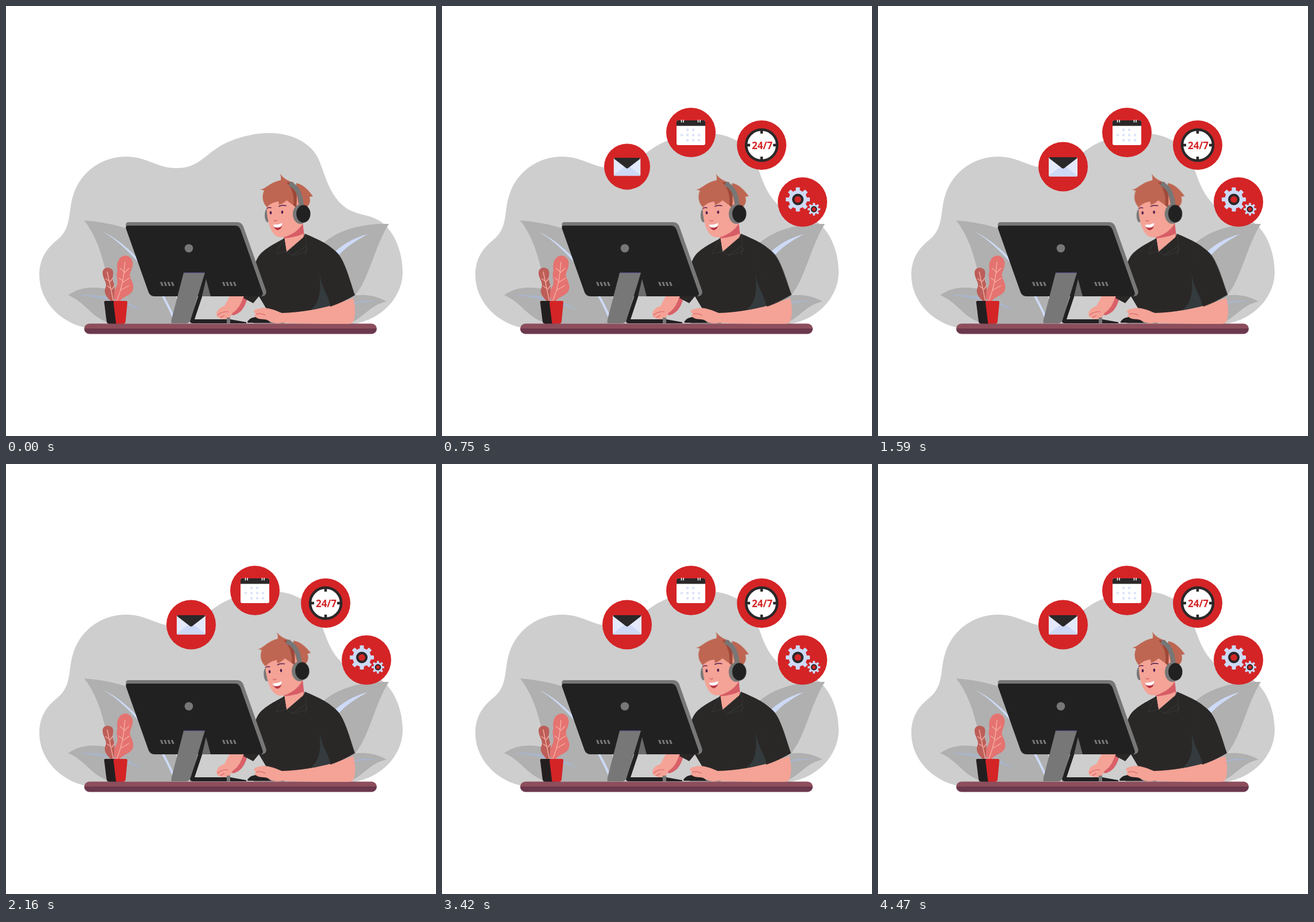
Recreate the animation shown at these times as an HTML page. Size 748x748 px, loop 4.5 s.

```html
<!DOCTYPE html>
<html lang="en">
<head>
<meta charset="utf-8">
<title>Support desk</title>
<style>
html, body { margin: 0; width: 100%; height: 100%; overflow: hidden; background: #fff; }
svg { display: block; width: 100vw; height: 100vh; }
.icon { transform-box: view-box; transform: scale(0); }
#head { transform-origin: 490px 395px; }
#sleeve { transform-origin: 565px 425px; }
text { font: 700 17px "Open Sans", sans-serif; }
</style>
</head>
<body>
<svg viewBox="0 0 748 748">
  <path fill="#cecece" d="M136 559C90 548 58 510 58 468C58 437 73 420 90 406C116 385 107 355 118 326C130 290 165 262 209 262C245 262 262 282 296 282C340 282 345 254 390 235C413 226 435 221 458 221C500 221 530 240 542 263C556 292 560 330 594 353C615 365 632 362 652 375C677 393 690 430 690 463C690 505 655 545 605 553L140 560Z"/>

  <g id="leaves">
    <g fill="#b0b0b0">
      <path d="M136 373C180 377 235 386 265 425C290 460 298 510 302 552H205C195 530 186 505 180 484C170 455 166 412 136 373Z"/>
      <path d="M108 503C135 484 170 488 200 500C225 511 245 535 255 552H185C150 546 139 515 108 503Z"/>
      <path d="M666 379C630 378 585 385 555 410C520 440 505 500 505 552C550 535 595 525 612 497C632 470 643 415 666 379Z"/>
      <path d="M662 514C640 502 620 500 590 506L560 552H598C625 540 632 521 662 514Z"/>
    </g>
    <path fill="#cddaf6" d="M169 393C218 416 266 474 298 552H293C268 485 217 421 169 393Z"/>
    <path fill="#a9b5cb" d="M124 503C160 500 205 508 236 529C200 516 165 506 124 503Z"/>
    <path fill="#cddaf6" d="M629 397C602 404 585 416 570 429L576 437C590 420 606 410 629 397Z"/>
    <path fill="#a9b5cb" d="M646 514C630 512 615 512 600 517V520C615 515 630 515 646 514Z"/>
  </g>

  <g id="plant">
    <path fill="#bd5e58" d="M183 514C175 507 169 498 173 490C177 482 168 474 168 464C168 456 176 453 183 457C190 462 184 470 186 478C190 487 189 500 188 514Z"/>
    <path fill="#e57370" d="M191 514C186 503 188 494 192 488C197 478 190 470 194 460C191 446 198 434 208 434C217 435 222 443 220 452C219 460 214 464 216 471C218 478 223 484 221 493C218 504 205 504 197 514Z"/>
    <g fill="none" stroke="#f5aea4" stroke-width="1.4">
      <path d="M176 462L187 514M180 479L173 474M181 480L186 473M183 492L176 487M184 493L189 486"/>
      <path d="M207 445C205 470 202 492 192 514M205 462L198 456M206 464L214 456M203 478L196 473M203 481L215 473M200 494L214 486"/>
    </g>
    <path fill="#231f20" d="M173 513H194V553H180Q176 553 175 549L171 517Q170 513 173 513Z"/>
    <path fill="#d42426" d="M188 513H208Q212 513 211 517L208 549Q207 553 203 553H194Q191 553 191 549L187 516Z"/>
  </g>

  <g id="desk">
    <clipPath id="top"><rect x="136" y="552.5" width="509" height="18" rx="9"/></clipPath>
    <g clip-path="url(#top)">
      <rect x="136" y="552" width="509" height="9" fill="#8d4e5d"/>
      <rect x="136" y="561" width="509" height="10" fill="#6b384d"/>
    </g>
  </g>

  <g id="leftArm">
    <path fill="#d96068" d="M403 504H421C417 520 412 533 396 538L385 535Z"/>
    <path fill="#f4a396" d="M390 503H414C409 517 405 527 394 534L389 543C381 546 372 545 367 540C364 532 370 525 380 522Z"/>
    <path fill="none" stroke="#d96068" stroke-width="1.2" d="M368 538C373 533 379 531 387 532M373 542L380 538"/>
  </g>

  <g id="body">
    <path fill="#d75c66" d="M483 400L516 375L519 402L487 428Z"/>
    <path fill="#f4a396" d="M484 404C493 403 505 402 517 396L518 403L488 430Z"/>
    <path fill="#2a2827" d="M484 404C473 411 449 421 439 436C430 450 425 480 413 508L430 517L440 505L456 532L480 538L566 523L600 500C590 465 584 441 574 429C562 413 540 405 520 396L517 403L488 428Z"/>
    <path fill="#343b3e" d="M545 463C548 490 560 500 565 524L530 528C548 515 548 490 545 463Z"/>
    <path fill="#1f1f1f" d="M484 403L481 409L471 430L488 427Z"/>
    <path fill="#2a2827" stroke="#393c3d" stroke-width=".8" d="M482 406L470 431L488 427L499 434L523 427L521 397L517 403L488 428Z"/>
    <path fill="none" stroke="#393c3d" stroke-width="1" d="M497 434L522 418M520 433L524 421"/>
  </g>

  <g id="head">
    <ellipse cx="455" cy="364" rx="5" ry="12" fill="#777"/>
    <path fill="#be6652" d="M505 308C519 311 526 321 534 331L528 332C531 342 526 349 520 352L504 350Z"/>
    <path fill="#f4a396" d="M453 340C453 361 456 383 464 394C470 402 475 403 484 402C495 399 509 391 516 379L506 330Z"/>
    <path fill="#be6652" d="M442 319C452 319 456 308 478 303Q479 298 477 292Q483 301 496 306L501 320V347C497 345 493 341 488 338C484 342 480 344 475 346L474 340C467 341 460 343 454 350C447 343 444 332 449 321Z"/>
    <path fill="#9f4838" d="M488 307L499 306C506 318 507 334 505 351L500 347C502 332 498 316 488 307Z"/>
    <path fill="none" stroke="#777" stroke-width="8" d="M493 309C507 314 513 330 514 350"/>
    <ellipse cx="512" cy="362" rx="13" ry="17" fill="#777"/>
    <ellipse cx="517.3" cy="361.5" rx="12.2" ry="15.3" fill="#222122"/>
    <path fill="none" stroke="#4b1b4d" stroke-width="1.5" stroke-linecap="round" d="M454 352Q457 349.500 461 351M475 348.500Q480 345.500 487 347.500"/>
    <ellipse cx="460.5" cy="359.5" rx="1.8" ry="2.8" fill="#4b1b4d"/>
    <ellipse cx="480.5" cy="358.5" rx="1.8" ry="2.8" fill="#4b1b4d"/>
    <path fill="none" stroke="#d75c66" stroke-width="1.5" stroke-linecap="round" d="M466 373Q469 375 471 373"/>
    <path fill="#b5303d" d="M464 380Q473 381 480 377Q481 388 473 390Q467 389 464 380Z"/>
    <path fill="#fff" d="M464 380Q473 381 480 377Q481 382 478 384Q471 387 466 384Z"/>
  </g>

  <g id="arm">
    <path fill="#777" d="M440 546H485V552H430Z"/>
    <path fill="#222122" d="M420 549C424 543 430 541 437 541C448 542 456 545 460 551H423Q419 551 420 549Z"/>
    <path fill="#f4a396" d="M566 521L604 508C608 523 608 537 605 547Q603 553 594 553C560 553 520 553 480 551C472 553 463 552 456 547C449 543 441 547 434 541Q430 538 435 536L431 532Q431 528 438 527C452 522 465 528 480 534C513 533 540 528 566 521Z"/>
    <path fill="none" stroke="#d96068" stroke-width="1.2" d="M435 536C441 534 446 535 451 538"/>
  </g>
  <path id="sleeve" fill="#2a2827" d="M548 411C571 421 580 431 586 444C595 463 601 486 607 503Q585 516 564 523C561 495 552 465 548 446Z"/>

  <g id="screen">
    <path fill="#222122" d="M343 500L328 545H391V552H324Q318 551 321 544L336 500Z"/>
    <path fill="#777" d="M384 542H390V552H384Z"/>
    <path fill="#222122" d="M390 545L418 550V552H390Z"/>
    <path fill="#777" d="M213 376H402Q410 376 413 384L452 494Q455 503 446 505H430L209 384Q207 376 213 376Z"/>
    <path fill="#222122" d="M212 382H399Q405 382 408 389L446 497Q449 505 441 505H258Q251 505 248 498L209 388Q207 382 212 382Z"/>
    <circle cx="318" cy="421.5" r="7.3" fill="#777"/>
    <g id="vents" fill="#777"></g>
    <path fill="#6b6b6b" d="M348 475L356 505H341Z"/>
    <path fill="#777" d="M309 464H346L321 546Q319 552 313 552H288Q287 549 288 545Z"/>
    <path stroke="#5b4b9a" d="M311 464H345"/>
  </g>

  <g class="icon" data-x="627" data-y="341">
    <g id="gears"></g>
  </g>

  <g class="icon" data-x="556" data-y="242">
    <circle cx="556" cy="242" r="27" fill="#fff" stroke="#2a2829" stroke-width="4.5"/>
    <path stroke="#2a2829" stroke-width="4.5" d="M556 215V222M556 262V269M529 242H536M576 242H583"/>
    <text x="557" y="249" fill="#d42426" text-anchor="middle">24/7</text>
  </g>

  <g class="icon" data-x="433" data-y="220">
    <rect x="408" y="199" width="50" height="43" rx="3" fill="#fff"/>
    <path fill="#2a2829" d="M411 199H455Q458 199 458 202V208.500H408V202Q408 199 411 199Z"/>
    <path stroke="#fff" stroke-width="1.6" stroke-linecap="round" d="M416.500 198.500V202M420 198.500V202M445.500 198.500V202M449 198.500V202"/>
    <g id="days" fill="#dce3fa"></g>
  </g>

  <g class="icon" data-x="322" data-y="279.500">
    <rect x="297" y="263" width="50" height="33.500" rx="2" fill="#e3e9fb"/>
    <path fill="#cdd9f6" d="M297 295L322 276L347 295Q347 296.500 345 296.500H299Q297 296.500 297 295Z"/>
    <path fill="#2a2829" d="M299 263H345Q347 263 346 265L324 282Q322 283.500 320 282L298 265Q297 263 299 263Z"/>
  </g>
</svg>
<script>
const LOOP = 4500;
const $ = id => document.getElementById(id);

function add(parent, tag, attrs) {
  const el = document.createElementNS("http://www.w3.org/2000/svg", tag);
  for (const key in attrs) el.setAttribute(key, attrs[key]);
  parent.append(el);
  return el;
}

function gear(x, y, body, tip, hub, core) {
  for (let a = 0; a < 360; a += 45) {
    add($("gears"), "rect", {
      x: x - tip * .17, y: y - tip, width: tip * .34, height: tip * .5,
      rx: tip * .06, fill: "#cddaf6", transform: `rotate(${a} ${x} ${y})`
    });
  }
  [[body, "#cddaf6"], [hub, "#2a2829"], [core, "#d42426"]].forEach(([r, fill]) =>
    add($("gears"), "circle", { cx: x, cy: y, r, fill }));
}
gear(619, 336.5, 16, 21, 10, 5.8);
gear(647, 353.5, 8, 11, 5.4, 3.2);

for (const left of [268, 376]) {
  for (let i = 0; i < 4; i++) {
    add($("vents"), "path", { d: `M${left + i * 6.3} 480h3.300l2.600 7h-3.300z` });
  }
}

[[427, 437], [417, 427, 437, 447], [427, 437, 447]].forEach((row, i) =>
  row.forEach(cx => add($("days"), "circle", { cx, cy: 215.5 + i * 9, r: 2.3 })));

const start = document.timeline.currentTime || 0;
function play(el, frames, duration = LOOP) {
  el.animate(frames, { duration, iterations: Infinity }).startTime = start;
}

// Icons pop in one after another and stay until the loop restarts.
const pops = [0, 145, 290, 470], popTime = 335;
document.querySelectorAll(".icon").forEach((el, i) => {
  const { x, y } = el.dataset;
  el.prepend(add(el, "circle", { cx: x, cy: y, r: 43, fill: "#d42426" }));
  el.style.transformOrigin = `${x}px ${y}px`;
  play(el, [
    { transform: "scale(0)", offset: 0 },
    { transform: "scale(0)", offset: pops[i] / LOOP, easing: "cubic-bezier(.33,0,.67,1)" },
    { transform: "scale(1)", offset: (pops[i] + popTime) / LOOP },
    { transform: "scale(1)", offset: 1 }
  ]);
});

play($("head"), [
  { transform: "rotate(0deg)", offset: 0 },
  { transform: "rotate(0deg)", offset: .2, easing: "ease-in-out" },
  { transform: "rotate(-3.3deg)", offset: .42, easing: "cubic-bezier(.3,0,.3,1)" },
  { transform: "rotate(0deg)", offset: 1 }
], LOOP / 5);

function sway(el, from, to) {
  play(el, [
    { transform: from, easing: "ease-in-out" },
    { transform: to, easing: "ease-in-out" },
    { transform: from }
  ], LOOP / 4);
}
sway($("arm"), "translate(0px, 0px)", "translate(2px, 0px)");
sway($("sleeve"), "rotate(0deg)", "rotate(-1.1deg)");
</script>
</body>
</html>
```
